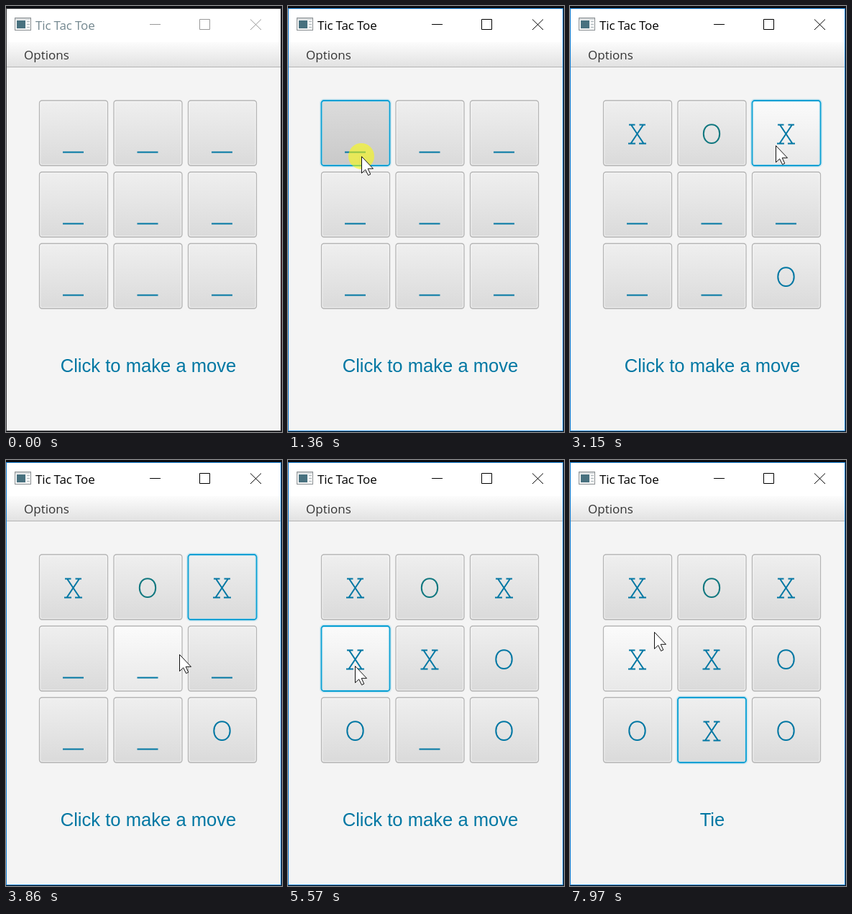
Write an HTML page that moves like this. It is 384 px wide and 590 px high and loops after 8 s.

```html
<!DOCTYPE html>
<html lang="en">
<head>
<meta charset="utf-8">
<title>Tic Tac Toe</title>
<style>
html, body { margin: 0; width: 100%; height: 100%; overflow: hidden; background: #14161c; }
svg { display: block; width: 384px; height: 590px; }
.ui { font: 17px "Open Sans", "Noto Sans", sans-serif; }
.status { font: 25.6px "Liberation Sans", Arial, sans-serif; fill: #0077a3; text-anchor: middle; }
.mark { fill: none; stroke: #0077a3; stroke-width: 2; }
</style>
</head>
<body>
<svg viewBox="0 0 384 590">
  <defs>
    <linearGradient id="desk" x2="0" y2="1">
      <stop stop-color="#0c0d12"/><stop offset=".45" stop-color="#1b1418"/>
      <stop offset=".6" stop-color="#4a1a24"/><stop offset="1" stop-color="#15161a"/>
    </linearGradient>
    <linearGradient id="bar" x2="0" y2="1">
      <stop stop-color="#fcfcfc"/><stop offset="1" stop-color="#e2e2e2"/>
    </linearGradient>
    <linearGradient id="normal" x2="0" y2="1">
      <stop stop-color="#efefef"/><stop offset="1" stop-color="#dadada"/>
    </linearGradient>
    <linearGradient id="hover" x2="0" y2="1">
      <stop stop-color="#fbfbfb"/><stop offset="1" stop-color="#e8e8e8"/>
    </linearGradient>
    <linearGradient id="armed" x2="0" y2="1">
      <stop stop-color="#dcdcdc"/><stop offset="1" stop-color="#c9c9c9"/>
    </linearGradient>
  </defs>
  <rect width="384" height="590" fill="url(#desk)"/>
  <rect id="frame" x="0" y="3" width="383" height="586"/>
  <rect x="1" y="4" width="381" height="46" fill="#fff"/>
  <rect x="1" y="50" width="381" height="34" fill="url(#bar)"/>
  <rect x="1" y="84" width="381" height="504" fill="#f4f4f4"/>
  <path d="M1 84.5H382" stroke="#b5b5b5"/>
  <g id="icon">
    <rect x="12.5" y="16.5" width="22" height="17" fill="#f4f5f5" stroke="#8d9295"/>
    <path d="M13 18H34" stroke="#d4d8da" stroke-width="2"/>
    <rect x="15" y="20" width="12" height="11" fill="#48717f"/>
    <path d="M29 21.5H33M29 25.5H33M29 29.5H33" stroke="#a9b4b8"/>
  </g>
  <text id="title" class="ui" x="41" y="33" letter-spacing="-.15">Tic Tac Toe</text>
  <text class="ui" x="25" y="73.5" fill="#333">Options</text>
  <path id="controls" d="M200 25.5H215M269.5 18.5H283.5V32.5H269.5ZM340 18.5L355 33M355 18.5L340 33" fill="none"/>
  <g id="board"></g>
  <text id="status" class="status" x="198" y="507"></text>
  <circle id="halo" r="18" fill="#ff0" opacity=".56"/>
  <path id="cursor" d="M.5 .5V23.5L5.7 18.7L9.6 26.5L12.8 25L9.2 17.3H16.5Z" fill="#fff" stroke="#111" stroke-linejoin="round"/>
</svg>
<script>
const LOOP = 8000;
const START = 330;
const BLANK = "M-14.5 25.5H14.5";
const X = "M-11.5 -12.5H-3M3 -12.5H11.5M-12.5 13.5H-2.5M2.5 13.5H12.5M-8.5 -12.5L9 13.5M8.5 -12.5L-9 13.5";
const O = "M0 -12.8C7 -12.8 11.2 -7 11.2 0S7 13 0 13S-11.2 7 -11.2 0S-7 -12.8 0 -12.8Z";

// Pointer moves: start, end, steps, from, control, to
const moves = [
  [330, 1050, 10, [195, 375], [95, 300], [102, 208]],
  [1980, 2610, 9, [102, 208], [200, 130], [294, 182]],
  [3150, 3710, 8, [294, 182], [265, 225], [211, 276]],
  [3860, 3860, 1, [211, 276], [226, 272], [241, 269]],
  [4950, 5180, 4, [241, 269], [143, 261], [93, 285]],
  [6100, 6480, 6, [93, 285], [150, 300], [197, 339]],
  [7890, 7970, 2, [197, 339], [160, 285], [117, 238]]
];
// Turns: press, release, player cell, reply cell
const turns = [
  [1360, 1430, 0, 1],
  [2840, 2920, 2, 8],
  [3935, 4010, 4, 6],
  [5410, 5570, 3, 5],
  [7030, 7110, 7, -1]
];

const $ = id => document.getElementById(id);
const set = (el, attrs) => { for (const k in attrs) el.setAttribute(k, attrs[k]); };

function add(parent, tag, attrs) {
  const el = document.createElementNS("http://www.w3.org/2000/svg", tag);
  set(el, attrs);
  parent.append(el);
  return el;
}

const cells = Array.from({ length: 9 }, (_, i) => {
  const x = 46.5 + 103.5 * (i % 3), y = 131 + 99 * Math.floor(i / 3);
  const box = (grow, r, more) => add($("board"), "rect", {
    x: x - grow, y: y - grow, width: 95 + 2 * grow, height: 90 + 2 * grow, rx: r, fill: "none", ...more
  });
  return {
    x, y,
    glow: box(1.5, 5, { stroke: "#039ed3", "stroke-width": 2, opacity: .16 }),
    face: box(0, 3.5, { stroke: "#b5b5b5", "stroke-width": 1.3 }),
    inner: box(-1.4, 2.5, { stroke: "#fff", opacity: .55 }),
    mark: add($("board"), "path", { class: "mark", transform: `translate(${x + 47} ${y + 46})` })
  };
});

function pointer(t) {
  let pos = moves[0][3];
  for (const [a, b, n, p, c, q] of moves) {
    if (t < a) break;
    const k = b > a ? Math.floor((t - a) / (b - a) * (n - 1) + 1e-6) + 1 : n;
    const s = Math.min(k / n, 1), r = 1 - s;
    pos = p.map((v, i) => r * r * v + 2 * r * s * c[i] + s * s * q[i]);
  }
  return pos;
}

function draw(t) {
  const [px, py] = pointer(t);
  const active = t >= turns[0][0];
  const marks = Array(9).fill(BLANK);
  let focus = -1, pressed = false;
  for (const [down, up, mine, reply] of turns) {
    if (t < down) break;
    focus = mine;
    pressed = t < up;
    if (!pressed) {
      marks[mine] = X;
      if (reply >= 0) marks[reply] = O;
    }
  }

  cells.forEach(({ x, y, glow, face, inner, mark }, i) => {
    const over = t >= START && px >= x && px <= x + 95 && py >= y && py <= y + 90;
    const fill = pressed && i === focus ? "armed" : over ? "hover" : "normal";
    const ring = i === focus;
    set(glow, { visibility: ring ? "visible" : "hidden" });
    set(face, { fill: `url(#${fill})`, stroke: ring ? "#039ed3" : "#b5b5b5", "stroke-width": ring ? 1.8 : 1.3 });
    set(inner, { stroke: ring ? "#a9dcee" : "#fff" });
    set(mark, { d: marks[i] });
    mark.style.stroke = i === 1 && marks[i] === O ? "#10777f" : "";
  });

  set($("frame"), { fill: active ? "#1883d7" : "#3a3a3e" });
  set($("title"), { fill: active ? "#000" : "#73878f" });
  set($("controls"), { stroke: active ? "#000" : "#999" });
  $("status").textContent = t >= turns[4][1] ? "Tie" : "Click to make a move";
  set($("halo"), { cx: px, cy: py, visibility: pressed ? "visible" : "hidden" });
  set($("cursor"), {
    transform: `translate(${Math.round(px)} ${Math.round(py)})`,
    visibility: t >= START ? "visible" : "hidden"
  });
}

const t0 = performance.now();
function tick() {
  draw((performance.now() - t0) % LOOP);
  requestAnimationFrame(tick);
}
draw(0);
requestAnimationFrame(tick);
</script>
</body>
</html>
```
